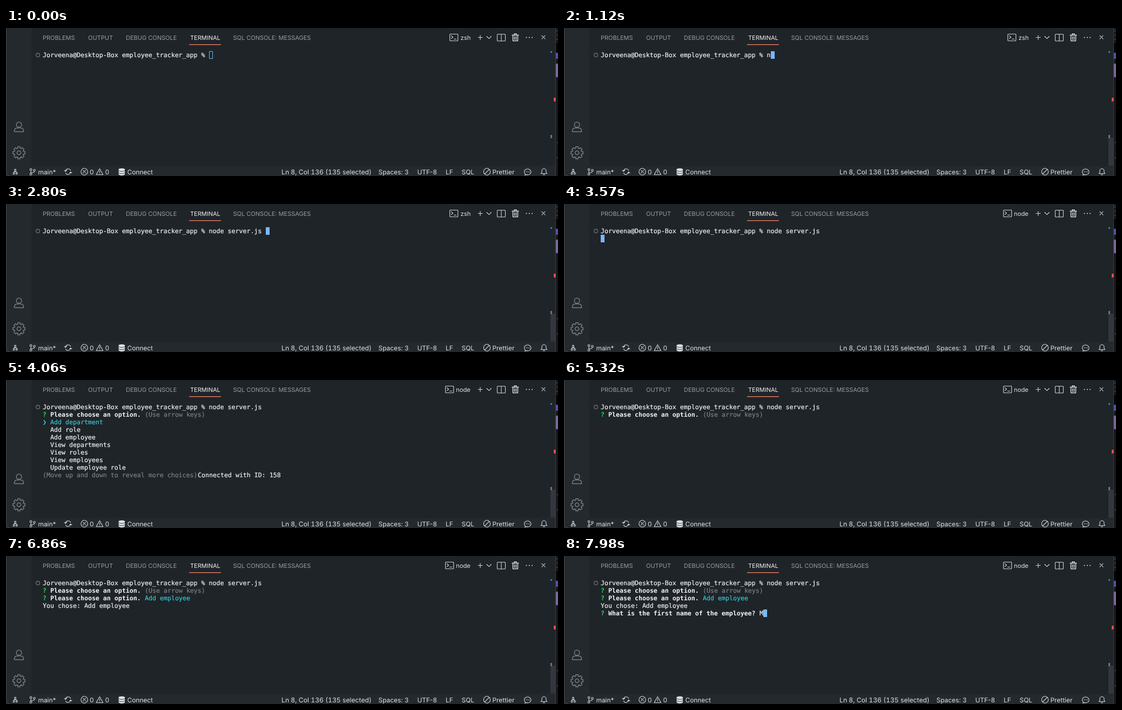
These frames come from a looping animation (1022x274 px, 8 s). An HTML page:

```html
<!DOCTYPE html>
<html lang="en">
<head>
<meta charset="utf-8">
<title>Terminal session</title>
<style>
  html, body { margin: 0; width: 100%; height: 100%; overflow: hidden; background: #1f2428; }
  svg { display: block; width: 100vw; height: 100vh; }
  text { white-space: pre; text-rendering: geometricPrecision; }
  .ui { font-family: Inter, "Open Sans", sans-serif; fill: #dde1e5; }
  .tabs { font-size: 11px; fill: #959da5; }
  .status { font-size: 11.9px; }
  .position { font-size: 12.2px; font-variant-numeric: tabular-nums; }
  .icon { fill: none; stroke: #d1d5da; stroke-width: 1.1; stroke-linecap: round; stroke-linejoin: round; }
  .side { stroke: #767c81; stroke-width: 1.5; }
  #screen { font: 11.628px "DejaVu Sans Mono", monospace; color: #f2f4f6; }
  #screen text { fill: currentColor; stroke: currentColor; stroke-width: .2; }
  #screen .bold { font-weight: bold; stroke: none; }
  #screen .green { color: #34d058; font-weight: bold; stroke: none; }
  #screen .cyan { color: #39c5cf; }
  #screen .dim { color: #7b8187; }
</style>
</head>
<body>
<svg viewBox="0 0 1022 274">
  <rect width="1022" height="274" fill="#1f2428"/>
  <path d="M0 0H47V256H1018V274H0Z" fill="#24292e"/>
  <path d="M.5 0V267Q.5 273.5 7 273.5" fill="none" stroke="#484d51"/>

  <!-- neighbouring window at the right edge -->
  <rect x="1017" width="1" height="274" fill="#3b4044"/>
  <rect x="1018" width="4" height="274" fill="#16191c"/>
  <path d="M1018 28h4v17h-4z" fill="#050608"/>
  <path d="M1018 46h4v11h-4z" fill="#544ca6"/>
  <path d="M1018 66h4v25h-4z" fill="#7a669a"/>
  <path d="M1019 5h2M1020 13h2M1019 21h2M1020 212h2M1020 240h2" stroke="#777c80"/>

  <!-- overview ruler -->
  <rect id="slider" x="1008" y="203" width="9" height="52" fill="#31373c"/>
  <rect x="1008" y="43" width="3" height="3" fill="#2188b5"/>
  <rect x="1008" y="198" width="3" height="6" fill="#6c7378"/>
  <rect x="1014" y="129" width="4" height="7" fill="#d5504c"/>

  <g class="ui tabs">
    <text x="68" y="21.5">PROBLEMS</text>
    <text x="152" y="21.5">OUTPUT</text>
    <text x="222" y="21.5">DEBUG CONSOLE</text>
    <text x="341" y="21.5" fill="#f0f2f4">TERMINAL</text>
    <text x="420.5" y="21.5">SQL CONSOLE: MESSAGES</text>
  </g>
  <rect x="339" y="30" width="59" height="1.4" fill="#e5795f"/>

  <!-- panel toolbar -->
  <g id="shell" class="icon">
    <rect x="821.7" y="11.2" width="15" height="12.6" rx="1"/>
    <path d="M824.5 14.3l3 2.7-3 2.7M829.5 20.5h4"/>
  </g>
  <text id="shellName" class="ui" y="21.5" font-size="11.3"></text>
  <g class="icon">
    <path d="M874 17.5h8M878 13.5v8M890 15.5l4.2 4.2 4.2-4.2"/>
    <rect x="909.5" y="11.5" width="15" height="12.5" rx="1"/><path d="M917 11.5v12.5"/>
    <path d="M937 13.2h12M941 12.7v-2h4v2M938.5 14v9.7h9V14M941.5 16v5.5M944.5 16v5.5" stroke-width="1.5"/>
    <path d="M963.5 17.5h.1M968.8 17.5h.1M974 17.5h.1" stroke-width="2"/>
    <path d="M992 14.2l6 6M998 14.2l-6 6"/>
  </g>

  <!-- activity bar -->
  <g class="icon side">
    <circle cx="24" cy="179" r="4.8"/>
    <path d="M15.5 192v-1.5q0-5.5 6-5.5h5q6 0 6 5.5v1.5z"/>
    <path id="gear"/><circle cx="24" cy="231" r="3.5"/>
  </g>

  <!-- status bar -->
  <g class="icon">
    <circle cx="17" cy="263" r="1.6"/><circle cx="14.5" cy="269.5" r="1.5"/><circle cx="19.8" cy="269.5" r="1.5"/>
    <path d="M17 264.8v1.4M14.5 268v-1.6h5.3v1.6"/>
    <circle cx="46" cy="262" r="1.8"/><circle cx="46" cy="270.5" r="1.8"/><circle cx="52.5" cy="263.5" r="1.8"/>
    <path d="M46 264v4.5M52.5 265.5q0 2.5-6.5 2.5"/>
    <path d="M110.2 265a5 5 0 0 1 9.4-1.4M119.8 267a5 5 0 0 1-9.4 1.4M108.2 263.5l2 2 2-2M117.8 268.5l2-2 2 2"/>
    <circle cx="145" cy="266" r="6.2"/><path d="M142.6 263.6l4.8 4.8M147.4 263.6l-4.8 4.8"/>
    <path d="M173.3 260.5l6.3 11h-12.6zM173.3 264.5v3.5M173.3 269.7v.1"/>
    <circle cx="890.5" cy="266" r="6.2"/><path d="M886.5 270l8-8"/>
    <path d="M961.5 270.2a6.3 5.3 0 1 1 2.6 1.2l-3.6.8z"/>
    <path d="M963.2 266.2h.1M966 266.2h.1M968.8 266.2h.1" stroke-width="1.5"/>
    <path d="M990.5 269.5h11l-1.5-2.2v-2.8a4 4 0 0 0-8 0v2.8zM994.5 271.2q1.5 1.5 3 0"/>
  </g>
  <g fill="#dde1e5">
    <path d="M208.5 262v8.5a5.8 2.4 0 0 0 11.6 0V262z"/><ellipse cx="214.3" cy="262" rx="5.8" ry="2.3"/>
  </g>
  <path d="M208.5 263.5a5.8 2 0 0 0 11.6 0M208.5 267.5a5.8 2 0 0 0 11.6 0" fill="none" stroke="#24292e" stroke-width=".9"/>
  <g class="ui status">
    <text x="59.5" y="270.5">main*</text>
    <text x="155" y="270.5">0</text>
    <text x="183.5" y="270.5">0</text>
    <text x="224.5" y="270.5">Connect</text>
    <text x="510" y="270.5" class="position">Ln 8, Col 136 (135 selected)</text>
    <text x="689.5" y="270.5">Spaces: 3</text>
    <text x="761.5" y="270.5">UTF-8</text>
    <text x="814" y="270.5">LF</text>
    <text x="843.5" y="270.5">SQL</text>
    <text x="900.5" y="270.5">Prettier</text>
  </g>

  <circle cx="59" cy="50" r="3.4" fill="none" stroke="#737b83" stroke-width="1.1"/>
  <g id="screen"></g>
</svg>
<script>
const LOOP = 8000, LEFT = 68, TOP = 43, CELL = 7, ROW = 14;
const $ = id => document.getElementById(id);

const PROMPT = "Jorveena@Desktop-Box employee_tracker_app % ";
const CHOICES = ["Add department", "Add role", "Add employee", "View departments",
                 "View roles", "View employees", "Update employee role"];
const TYPING = [[0, ""], [1120, "n"], [1190, "no"], [1400, "nod"], [1470, "node"],
                [2100, "node "], [2520, "node s"], [2800, "node server.js "]];

// A row is a list of [text, style] runs.
const ask = (question, ...rest) => [["? ", "green"], [question + " ", "bold"], ...rest];
const choose = (...rest) => ask("Please choose an option.", ...rest);
const hint = choose(["(Use arrow keys)", "dim"]);
const menu = (selected, ...tail) => [
  ...CHOICES.map((name, i) => [i === selected ? ["❯ " + name, "cyan"] : ["  " + name, ""]]),
  [["(Move up and down to reveal more choices)", "dim"], ...tail]
];
const answered = [hint, choose(["Add employee", "cyan"]), [["You chose: Add employee", ""]]];
const nameQuestion = typed => [...answered, ask("What is the first name of the employee?", [typed, ""])];

// Output below the command line: [start, rows, cursor shown]
const OUTPUT = [
  [0, [], true],
  [3430, [[]], true],
  [3920, [hint], false],
  [3990, [hint, ...menu(0)], false],
  [4060, [hint, ...menu(0, ["Connected with ID: 158", ""])], false],
  [5320, [hint], false],
  [5390, [hint, choose(), ...menu(1)], false],
  [6090, [hint, choose(), ...menu(2)], false],
  [6860, answered, false],
  [6930, nameQuestion(""), true],
  [7980, nameQuestion("M"), true]
];

const at = (steps, t) => steps.findLast(step => step[0] <= t);

function drawRow(runs, row) {
  let column = 0;
  return runs.map(([text, style]) => {
    const x = LEFT + column * CELL;
    column += text.length;
    return `<text x="${x}" y="${TOP + 11 + row * ROW}" class="${style}">${text}</text>`;
  }).join("");
}

function drawCursor(rows, focused) {
  const width = rows.at(-1).reduce((sum, [text]) => sum + text.length, 0);
  const x = LEFT + width * CELL, y = TOP + (rows.length - 1) * ROW;
  return focused
    ? `<rect x="${x}" y="${y}" width="7" height="14" fill="#79b8ff"/>`
    : `<rect x="${x + .5}" y="${y + .5}" width="6" height="13" fill="none" stroke="#62bbe8"/>`;
}

function gearPath() {
  const points = [];
  for (let tooth = 0; tooth < 8; tooth++)
    for (const [offset, radius] of [[-.26, 8.8], [-.2, 11.4], [.2, 11.4], [.26, 8.8]]) {
      const angle = tooth * Math.PI / 4 + offset;
      points.push(`${24 + radius * Math.cos(angle)} ${231 + radius * Math.sin(angle)}`);
    }
  return "M" + points.join("L") + "Z";
}

let shown = "";
function render(t) {
  const [, output, cursor] = at(OUTPUT, t);
  const rows = [[[PROMPT + at(TYPING, t)[1], ""]], ...output];
  const markup = rows.map(drawRow).join("") + (cursor ? drawCursor(rows, t >= 630) : "");
  if (markup !== shown) $("screen").innerHTML = shown = markup;

  const node = t >= 3570;
  $("shell").setAttribute("transform", `translate(${node ? -8 : 0})`);
  $("shellName").setAttribute("x", node ? 833 : 841.5);
  $("shellName").textContent = node ? "node" : "zsh";
  $("slider").setAttribute("opacity", t < 630 ? 0 : t < 700 ? .5 : 1);
}

$("gear").setAttribute("d", gearPath());
const start = performance.now();
function tick() {
  render((performance.now() - start) % LOOP);
  requestAnimationFrame(tick);
}
tick();
</script>
</body>
</html>
```
